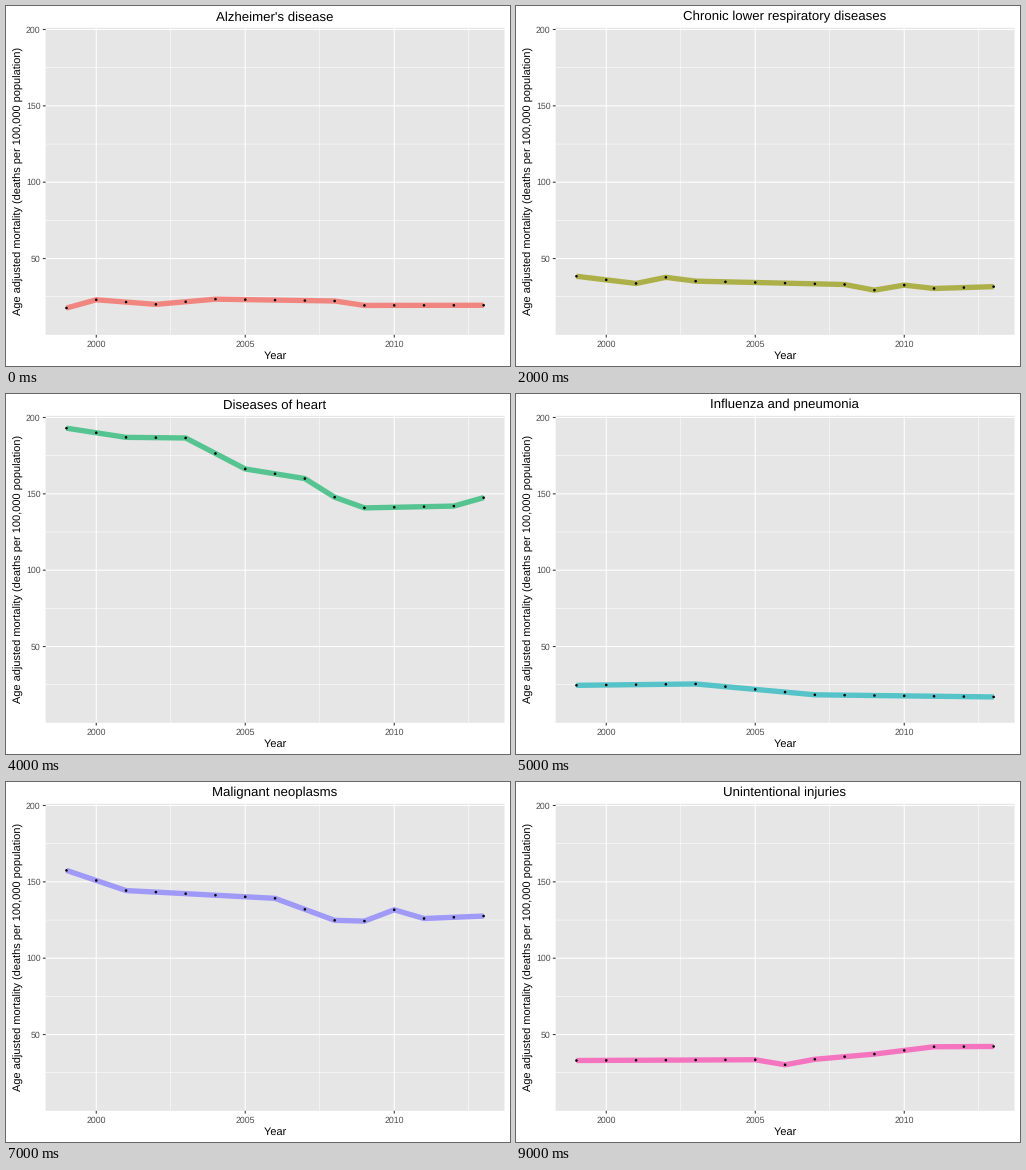
A matplotlib script for the animation above (10000 ms loop, 504 px wide and 360 px high).

```python
import numpy as np
import matplotlib.pyplot as plt
from matplotlib.animation import FuncAnimation
from matplotlib.patches import Circle, Rectangle

plt.rcParams["font.family"] = "Liberation Sans"
plt.rcParams["text.kerning_factor"] = 6  # plain advance widths
plt.rcParams["text.hinting"] = "none"

W, H, DPI = 504, 360, 72
LEFT, RIGHT, TOP, BOTTOM = 39.6, 498.5, 21.8, 328.8
MIDDLE = (LEFT + RIGHT) / 2
START, SPAN = 1999, 14
STEPS = np.arange(SPAN + 1)
YEAR_W = (RIGHT - LEFT) / (SPAN * 1.1)

# title, line colour, turning points as (years after the start, rate)
CAUSES = [
    ("Alzheimer's disease", "#f18681",
     [(0, 17.6), (1, 23), (3, 20), (5, 23.4), (9, 22.2), (10, 19.3), (14, 19.4)]),
    ("Cerebrovascular diseases", "#d09a45",
     [(0, 58), (3, 55), (7, 41), (10, 37), (14, 38)]),
    ("Chronic lower respiratory diseases", "#adaf49",
     [(0, 38.4), (2, 33.7), (3, 37.7), (4, 35.2), (9, 33), (10, 29.3),
      (11, 32.6), (12, 30.4), (14, 31.6)]),
    ("Diabetes mellitus", "#62ba46",
     [(0, 28.5), (6, 30.4), (10, 22.4), (14, 25)]),
    ("Diseases of heart", "#55c490",
     [(0, 193), (2, 187), (4, 186.6), (6, 166.3), (8, 160), (9, 147.8),
      (10, 140.8), (13, 142), (14, 147.5)]),
    ("Influenza and pneumonia", "#55c3c7",
     [(0, 24.6), (4, 25.5), (8, 18.4), (14, 17)]),
    ("Intentional self-harm (suicide)", "#51b3ee",
     [(0, 14), (4, 15.8), (5, 17.1), (6, 15.3), (9, 15.5), (14, 21.3)]),
    ("Malignant neoplasms", "#9f99f8",
     [(0, 157.5), (2, 144.3), (7, 139.2), (9, 124.8), (10, 124.3),
      (11, 131.7), (12, 126), (14, 127.6)]),
    ("Nephritis, nephrotic syndrome and nephrosis", "#df78ea",
     [(0, 9.3), (1, 11), (3, 11.5), (5, 14.1), (6, 10.4), (12, 11.4), (14, 13.8)]),
    ("Unintentional injuries", "#f474bf",
     [(0, 33), (6, 33.5), (7, 30.2), (8, 33.8), (10, 37.2), (12, 42), (14, 42.2)]),
]


def px(year):
    return LEFT + (year - START + SPAN * 0.05) * YEAR_W


def py(rate):
    return 328.9 - rate * 1.527


fig = plt.figure(figsize=(W / DPI, H / DPI), dpi=DPI, facecolor="white")
ax = fig.add_axes([0, 0, 1, 1])
ax.set(xlim=(0, W), ylim=(H, 0))
ax.axis("off")


def rule(x0, y0, x1, y1, width, color="white"):
    ax.plot([x0, x1], [y0, y1], color=color, lw=width, zorder=2,
            solid_capstyle="butt", snap=False)


def label(x, y, text, size, color="black", ha="center", **kw):
    return ax.text(x, y, text, fontsize=size, color=color, ha=ha,
                   va="baseline", **kw)


ax.add_patch(Rectangle((LEFT, TOP), RIGHT - LEFT, BOTTOM - TOP,
                       fc="#e6e6e6", ec="none", zorder=1, snap=False))

for year in np.arange(2000, 2013, 2.5):
    x, major = px(year), year % 5 == 0
    rule(x, TOP, x, BOTTOM, 1.07 if major else 0.53)
    if major:
        rule(x, BOTTOM, x, BOTTOM + 2.75, 1.07, "#333333")
        label(x, 341.3, f"{year:.0f}", 8.8, "#4d4d4d")

for rate in range(25, 201, 25):
    y, major = py(rate), rate % 50 == 0
    rule(LEFT, y, RIGHT, y, 1.07 if major else 0.53)
    if major:
        rule(LEFT - 2.75, y, LEFT, y, 1.07, "#333333")
        label(34.6, y + 3.2, str(rate), 8.8, "#4d4d4d", "right")

label(MIDDLE, 353, "Year", 11)
label(16, 175.2, "Age adjusted mortality (deaths per 100,000 population)", 11,
      rotation=90, rotation_mode="anchor")

title = label(MIDDLE - 0.2, 14.6, "", 13.2)
trend, = ax.plot([], [], lw=5.33, zorder=3, solid_capstyle="butt",
                 solid_joinstyle="round")
dots = [ax.add_patch(Circle((0, 0), 1.3, fc="black", ec="none", zorder=4))
        for _ in STEPS]


def draw(i):
    name, color, points = CAUSES[i]
    xs = px(START + STEPS)
    ys = py(np.interp(STEPS, *zip(*points)))
    title.set_text(name)
    trend.set_data(xs, ys)
    trend.set_color(color)
    for dot, spot in zip(dots, zip(xs, ys)):
        dot.set_center(spot)
    return title, trend, *dots


anim = FuncAnimation(fig, draw, frames=len(CAUSES), interval=1000,
                     repeat=True, repeat_delay=0)
plt.show()
```
